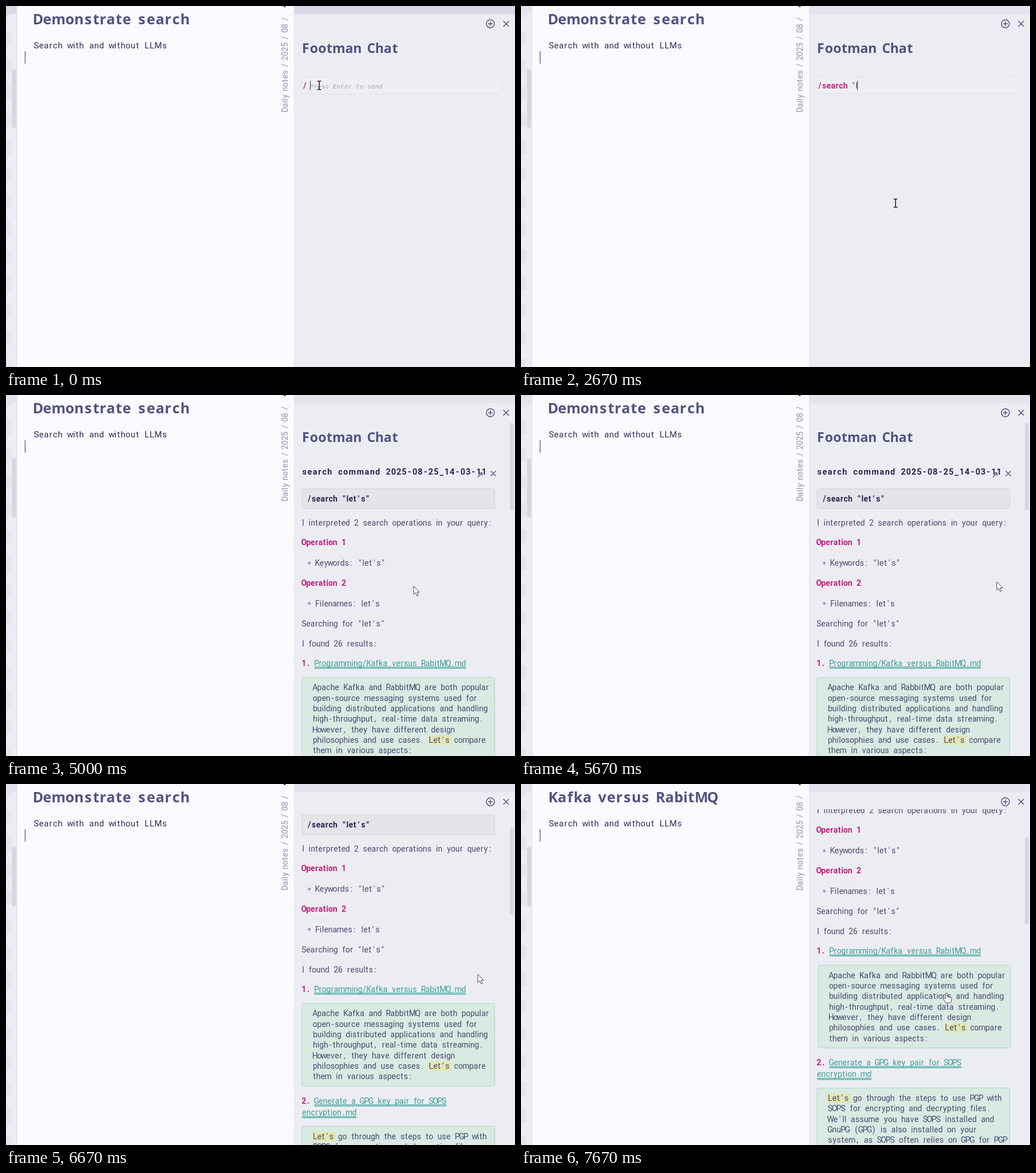
Animation of 889 by 630 pixels, one loop 8 s. Source, as an HTML page:

```html
<!DOCTYPE html>
<html lang="en">
<head>
<meta charset="utf-8">
<title>Demonstrate search</title>
<style>
html, body { margin: 0; width: 100%; height: 100%; overflow: hidden; background: #ecedf2; }
svg { display: block; width: 100%; height: 100%; }
text { font: 14px Roboto, "Noto Sans", sans-serif; font-variant-ligatures: none; fill: #4b4871; text-anchor: middle; }
.h1 { font: 700 25px "Noto Sans", sans-serif; fill: #505282; }
.h2 { font: 700 23px "Noto Sans", sans-serif; fill: #505282; }
.h3 { font-weight: 700; font-size: 14.5px; fill: #28264f; }
.note { font-size: 15px; fill: #302f58; }
.path { fill: #8d92b3; }
.cmd { font-weight: 700; fill: #28264f; }
.pink { font-weight: 700; fill: #c1207f; }
.link { fill: #38a097; }
.hint { font: italic 11.2px "Liberation Mono", monospace; fill: #a5a7b0; text-anchor: start; }
.card { fill: #d8eae2; stroke: #a6dcc0; }
.mark { fill: #e2e6b2; }
.thumb { fill: #d5d7dd; }
.icon { fill: none; stroke: #55557f; stroke-width: 1.5; stroke-linecap: round; }
.pointer { fill: #fff; stroke: #45454d; stroke-linejoin: round; }
</style>
</head>
<body>
<svg id="stage" viewBox="0 0 889 630">
  <defs><clipPath id="view"><rect x="504" y="44" width="376" height="586"/></clipPath></defs>
  <rect width="889" height="630" fill="#ecedf2"/>
  <g id="blocks" fill="#e7e5ec"></g>
  <g id="bar"><rect width="18" height="14.5"/><rect x="503" width="386" height="14.5"/></g>
  <rect class="thumb" x="10.5" y="110" width="7" height="103.5" rx="3"/>
  <rect x="18" width="486" height="630" fill="#dfe1e9"/>
  <rect x="19.5" width="483.5" height="630" fill="#fbfaff"/>
  <rect x="32.5" y="79" width="2" height="21.5" fill="#8785b6"/>
  <rect x="485" width="3.5" height="1.7" fill="#302f58"/>
  <g id="left"></g>
  <g id="path" transform="translate(491.5 185) rotate(-90)"></g>
  <g class="icon">
    <circle cx="846" cy="31" r="7"/>
    <path d="M842.5 31h7M846 27.5v7M869 26.5l9 9M878 26.5l-9 9"/>
  </g>
  <g id="compose">
    <rect x="517" y="123.5" width="347.5" height="29.5" rx="3" fill="#eeeff4" stroke="#e0e1e8"/>
    <g id="typed"></g>
    <text id="hint" class="hint" y="144">Press Enter to send</text>
    <rect id="caret" y="130" width="1" height="17" fill="#45454d"/>
  </g>
  <g clip-path="url(#view)"><g id="scroll"><g id="title"></g><g id="chat"></g></g></g>
  <rect id="thumb" class="thumb" x="880" y="49" width="6.8" height="152.5" rx="3"/>
  <path id="beam" d="M-3.5 -7.2h7M0 -7.2v14.4M-3.5 7.2h7" fill="none" stroke="#25252c" stroke-width="1.6"/>
  <path id="arrow" class="pointer" d="M0 0v14.5l3.4 -3 2.3 5.3 2.4 -1 -2.3 -5.2h4.5z"/>
  <path id="hand" class="pointer" d="M-1.2 9V1.2a1.4 1.4 0 0 1 2.8 0V6l6 1.6q1.8 .6 1.5 2.4l-1 5.4q-.4 1.6 -2 1.6H0q-1 0 -1.6 -.8L-5 11q-.6 -1.6 1 -1.8z"/>
</svg>
<script>
const $ = id => document.getElementById(id);

function add(parent, tag, attrs, content) {
  const el = document.createElementNS("http://www.w3.org/2000/svg", tag);
  for (const k in attrs) el.setAttribute(k, attrs[k]);
  if (content) el.textContent = content;
  parent.append(el);
  return el;
}

// Four-width type: half, three-quarter, full and wide cells
const cell = (c, gap = 1) => c === " " ? gap : /[ilI]/.test(c) ? 0.5 : /[rtfj]/.test(c) ? 0.75 : /[mM]/.test(c) ? 1.5 : c === "W" ? 1.25 : 1;
const widthOf = (s, unit) => [...s].reduce((w, c) => w + cell(c) * unit, 0);

function type(parent, s, x, y, unit = 7.64, cls = "", gap = 1) {
  let pen = x;
  const xs = [...s].map(c => {
    const w = cell(c, gap) * unit, mid = pen + w / 2;
    pen += w;
    return mid.toFixed(2);
  });
  return add(parent, "text", { x: xs.join(" "), y, class: cls }, s);
}

function link(parent, s, x, y) {
  const unit = 7.62, w = widthOf(s, unit);
  type(parent, s, x, y, unit, "link");
  add(parent, "rect", { x, y: y + 1.6, width: w, height: 1, fill: "#38a097" });
  add(parent, "rect", { x, y: y + 3.4, width: w, height: 1.7, fill: "#58b2a7" });
}

function card(y, height, lines) {
  const g = add($("chat"), "g", {});
  add(g, "rect", { x: 517, y, width: 336.5, height, rx: 3, class: "card" });
  lines.forEach((s, i) => {
    const base = y + 22.5 + i * 18.35, at = s.indexOf("Let's");
    if (at >= 0) add(g, "rect", { x: 535 + widthOf(s.slice(0, at), 7.64), y: base - 13, width: 41, height: 16.5, rx: 2, class: "mark" });
    type(g, s, 536, base);
  });
  return g;
}

function bullet(s, y) {
  add($("chat"), "circle", { cx: 529.7, cy: y - 4.8, r: 2.5, fill: "#a19ec6" });
  type($("chat"), s, 540, y);
}

add($("blocks"), "rect", { y: 15, width: 9, height: 5 });
for (let i = 0; i < 13; i++) add($("blocks"), "rect", { y: 45 + 47.5 * i, width: 9, height: 23 });

const heads = ["Demonstrate search", "Kafka versus RabitMQ"].map(s => type($("left"), s, 48, 32, 15.9, "h1", 0.65));
type($("left"), "Search with and without LLMs", 48.5, 73.5, 8.78, "note");
type($("path"), "Daily notes / 2025 / 08 /", 0, 0, 7.85, "path", 0.57);
type($("title"), "Footman Chat", 516, 82, 14.5, "h2", 0.65);

const chat = $("chat");
type(chat, "search command 2025-08-25_14-03-11", 516.5, 139, 9.3, "h3");
add(chat, "path", { d: "M847 133l8 8M855 133l-8 8M824.5 143l7 -7M827 136h4.5v4.5", class: "icon" });
add(chat, "rect", { x: 517, y: 163.8, width: 336.5, height: 34.5, rx: 3, fill: "#e4e4e9", stroke: "#d2d3da" });
type(chat, '/search "let\'s"', 526, 186, 7.82, "cmd");
type(chat, "I interpreted 2 search operations in your query:", 517, 228, 7.6);
type(chat, "Operation 1", 516.5, 262, 7.75, "pink");
bullet('Keywords: "let\'s"', 298);
type(chat, "Operation 2", 516.5, 333, 7.75, "pink");
bullet("Filenames: let's", 368.5);
type(chat, 'Searching for "let\'s"', 516.5, 403.5);
type(chat, "I found 26 results:", 517, 438.5);
type(chat, "1.", 516.5, 472.5, 7.75, "pink");
link(chat, "Programming/Kafka versus RabitMQ.md", 538.5, 472.5);
const firstCard = card(492.8, 144.5, [
  "Apache Kafka and RabbitMQ are both popular",
  "open-source messaging systems used for",
  "building distributed applications and handling",
  "high-throughput, real-time data streaming.",
  "However, they have different design",
  "philosophies and use cases. Let's compare",
  "them in various aspects:"
]);
type(chat, "2.", 516.5, 667.5, 7.75, "pink");
link(chat, "Generate a GPG key pair for SOPS", 538.5, 667.5);
link(chat, "encryption.md", 517, 688);
card(707.3, 144.5, [
  "Let's go through the steps to use PGP with",
  "SOPS for encrypting and decrypting files.",
  "We'll assume you have SOPS installed and",
  "GnuPG (GPG) is also installed on your",
  "system, as SOPS often relies on GPG for PGP"
]);

const STEP = 1000 / 3, LAST = 23;
const command = "/search", query = '"let\'s"';
const cmdKeys = [1, 2, 3, 5, 6, 7];
const queryKeys = [0, 1, 2, 3, 4, 5, 7];
// step, cursor, x, y
const moves = [
  [0, "beam", 547, 138.5], [1, "beam", 572, 156], [2, "beam", 654.2, 344],
  [14, "arrow", 690, 334], [15, "arrow", 712, 333.5], [16, "arrow", 790, 329],
  [17, "arrow", 831, 326], [20, "arrow", 824, 332],
  [21, "hand", 808, 338.5], [22, "hand", 772, 355], [23, "hand", 743, 365]
];
const show = (el, on) => el.setAttribute("display", on ? "inline" : "none");
const scrollAt = k => k < 18 ? 0 : k < 20 ? 7.3 : k < 21 ? 110 : 176.7;

function compose(k) {
  const cmd = command.slice(0, cmdKeys[Math.min(k, 5)]);
  const arg = query.slice(0, k < 6 ? 0 : queryKeys[Math.min(k - 6, 6)]);
  const end = 518 + widthOf(cmd, 7.8) + 5.2;
  $("typed").replaceChildren();
  type($("typed"), cmd, 518, 143.5, 7.8, "pink");
  if (arg) type($("typed"), arg, end + 0.8, 143.5);
  show($("hint"), !arg);
  $("hint").setAttribute("x", end - 0.5);
  $("caret").setAttribute("x", end + widthOf(arg, 7.64));
  show($("caret"), k < 12);
}

function render(k) {
  const answered = k >= 13, scroll = scrollAt(k);
  $("bar").setAttribute("fill", k ? "#e4e4ef" : "#d9d8e7");
  show($("compose"), !answered);
  show(chat, answered);
  show($("thumb"), answered);
  if (!answered) compose(k);
  $("scroll").setAttribute("transform", `translate(0 ${-scroll})`);
  $("thumb").setAttribute("y", 49 + scroll * 0.247);
  firstCard.setAttribute("transform", `translate(${k >= 22 ? 2 : 0} 0)`);
  heads.forEach((h, i) => show(h, i === (k >= 23 ? 1 : 0)));
  const [, kind, x, y] = moves.filter(m => m[0] <= k).pop();
  for (const id of ["beam", "arrow", "hand"]) show($(id), id === kind);
  $(kind).setAttribute("transform", `translate(${x} ${y})`);
}

let shown = -1;
function tick() {
  const k = Math.min(LAST, Math.floor((performance.now() % 8000 + 4) / STEP));
  if (k !== shown) render(shown = k);
  requestAnimationFrame(tick);
}
tick();
</script>
</body>
</html>
```
